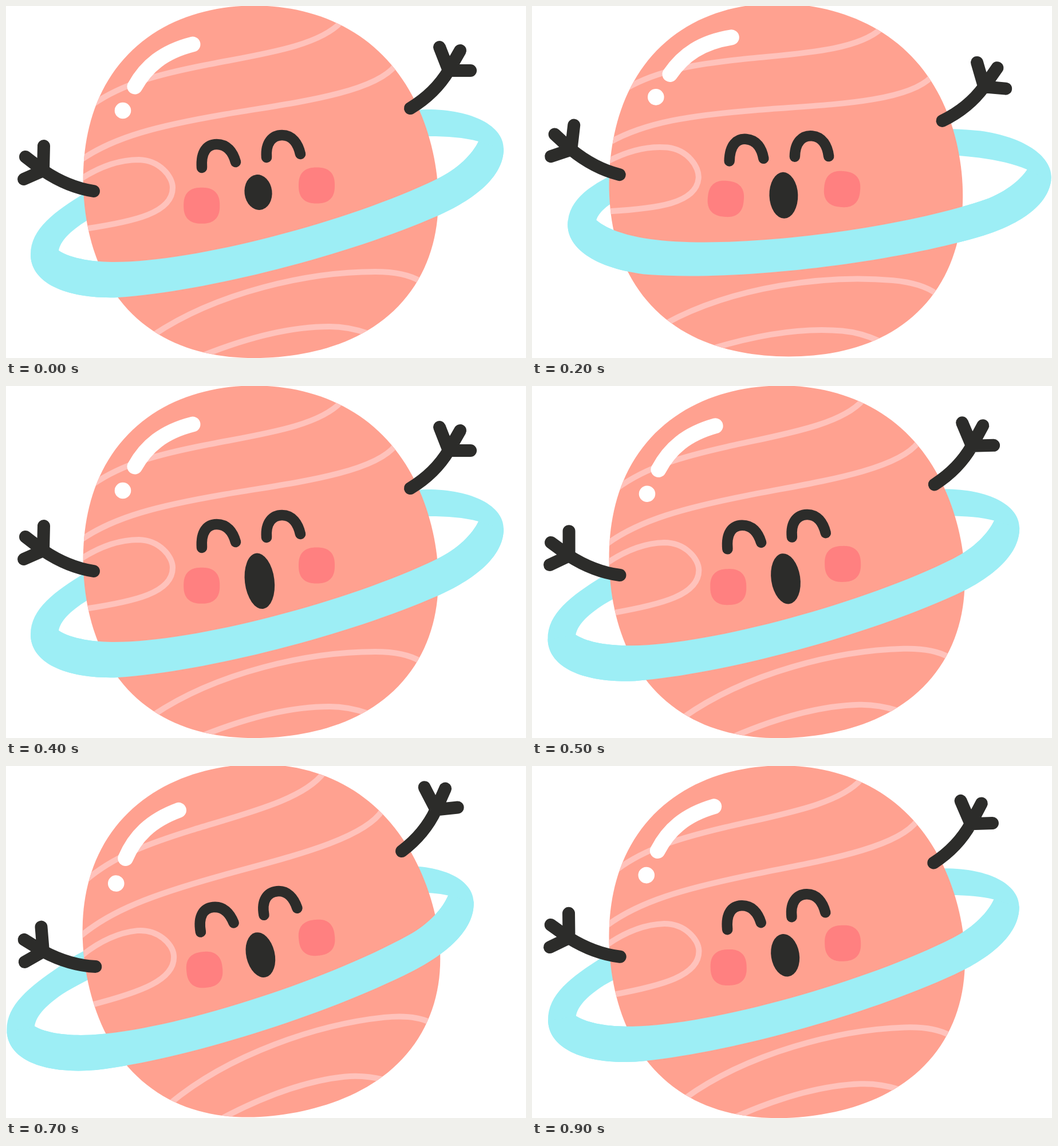
Write an HTML page with a canvas that moves like this. It is 908x616 px and loops after 1 s.

```html
<!DOCTYPE html>
<html lang="en">
<head>
<meta charset="utf-8">
<title>Singing planet</title>
<style>
  html, body { margin: 0; width: 100%; height: 100%; overflow: hidden; background: #fff; }
  canvas { display: block; }
</style>
</head>
<body>
<canvas id="stage" width="908" height="616"></canvas>
<script>
const ctx = document.getElementById('stage').getContext('2d');
const CX = 444, CY = 308;          // planet pivot
const RX = 458.5, RY = 332.5;      // ring pivot
const STEP = 100, BEATS = 10;
const RAD = Math.PI / 180;

const SKIN = '#ffa190', STRIPE = '#ffc2bb', CYAN = '#9deef5';
const INK = '#2c2c2a', BLUSH = '#ff8080', WHITE = '#fff';

// linear motion through [beat, value] keys
function track(keys, beat) {
  const i = keys.findIndex(key => key[0] > beat);
  const [t0, v0] = keys[i - 1], [t1, v1] = keys[i];
  return v0 + (v1 - v0) * (beat - t0) / (t1 - t0);
}

const swingKeys = [[0, 0], [2, 1], [4, 0], [6, -0.47], [7, -1], [10, 0]];
const mouthKeys = [[0, 31], [1, 40.5], [2, 40.5], [4, 49], [6, 40], [7, 40], [9, 37.5], [10, 31]];

// short lean to the right, then a longer one to the left
function poseAt(beat) {
  const swing = track(swingKeys, beat);
  const right = beat < 4;
  const phase = right ? beat / 4 : (beat - 4) / 6;
  const slide = Math.sin(Math.PI * phase) ** 1.5;
  const tilt = swing * (right ? 5.2 : 6);
  return {
    tilt,
    bob: -0.09 * tilt * tilt,
    ringTilt: swing * (right ? 7.9 : 3),
    dx: slide * (right ? 30 : -47.5),
    dy: slide * (right ? -2 : 8.5),
    open: track(mouthKeys, beat)
  };
}

function blob(x, y, radius) {
  const p = new Path2D();
  for (let deg = 0; deg < 360; deg += 2) {
    const a = deg * RAD, r = radius(a);
    p.lineTo(x + r * Math.cos(a), y + r * Math.sin(a));
  }
  p.closePath();
  return p;
}

const wave = (a, k, size, phase) => size * Math.cos(k * a - phase * RAD);
const lumpy = a => 313.7 + wave(a, 1, 3.3, 124) + wave(a, 2, 4, 82) +
  wave(a, 3, 3.6, 57) + wave(a, 4, 5.2, 160);
const squircle = a =>
  31.5 / (Math.abs(Math.cos(a)) ** 2.5 + Math.abs(Math.sin(a)) ** 2.5) ** 0.4;

const planet = blob(CX, CY, lumpy);
const cheeks = [blob(341.7, 349.3, squircle), blob(542.5, 314, squircle)];

const stripes = new Path2D(
  'M585 28C545 72 440 85 345 104C270 119 205 135 152 172' +
  'M680 104C640 156 480 172 380 190C270 209 190 228 130 270' +
  'M130 303C170 277 205 269 232 269C268 270 291 298 291 318C291 362 225 377 138 390' +
  'M257 576C370 500 530 465 645 465C680 465 706 471 724 482' +
  'M345 611C410 585 490 561 565 561C592 561 612 566 632 573');
const shine = new Path2D('M225 141C245 105 275 80 326 67');
const eyes = new Path2D(
  'M342 283C340 255 351 242 368 242C386 242 396 255 401 273' +
  'M455 265C453 239 465 226 482 226C500 226 510 241 514 259');
const arms = new Path2D(
  'M706 179Q749 153 773 113L757 72M773 113L793 78M773 113L811 113' +
  'M153 324Q108 317 65 288L34 264M65 288L66 245M65 288L31 303');

const underside = 'C869 300 815 340 754 367C600 435 350 500 195 510C100 513 43 482 43 435';
const frontEdge = 'M92 428C115 443 155 448 190 448C330 448 600 377 752 303C790 285 815 258 825 237';
const ring = new Path2D(
  'M43 435C43 390 84 360 140 326C240 254 590 188 735 181C815 181 869 210 869 250' + underside + 'Z' +
  frontEdge + 'C800 230 770 228 739 228C500 232 245 318 142 375C110 395 95 412 92 428Z');
const ringFront = new Path2D(frontEdge + 'L869 250' + underside + 'Z');

function fill(path, color, rule) {
  ctx.fillStyle = color;
  ctx.fill(path, rule || 'nonzero');
}

function stroke(path, color, width) {
  ctx.strokeStyle = color;
  ctx.lineWidth = width;
  ctx.stroke(path);
}

function ellipse(x, y, rx, ry, tilt, color) {
  const p = new Path2D();
  p.ellipse(x, y, rx, ry, tilt * RAD, 0, 2 * Math.PI);
  fill(p, color);
}

// draw with a rotation about (x, y) followed by a shift
function posed(x, y, tilt, dx, dy, draw) {
  ctx.save();
  ctx.translate(x + dx, y + dy);
  ctx.rotate(tilt * RAD);
  ctx.translate(-x, -y);
  draw();
  ctx.restore();
}

function drawBody() {
  fill(planet, SKIN);
  ctx.save();
  ctx.clip(planet);
  stroke(stripes, STRIPE, 10);
  ctx.restore();
  stroke(shine, WHITE, 27);
  ellipse(204, 183, 14.3, 14.3, 0, WHITE);
}

function drawFace(open) {
  for (const cheek of cheeks) fill(cheek, BLUSH);
  stroke(eyes, INK, 18.5);
  const grow = open - 31;
  ellipse(440.5 + grow * 0.13, 326 + grow * 0.85, 24 + grow * 0.1, open, -7, INK);
}

function render(time) {
  const pose = poseAt(Math.floor(time / STEP) % BEATS);
  const onPlanet = draw => posed(CX, CY, pose.tilt, 0, pose.bob, draw);
  const onRing = draw => posed(RX, RY, pose.ringTilt, pose.dx, pose.dy, draw);

  ctx.fillStyle = WHITE;
  ctx.fillRect(0, 0, 908, 616);
  onRing(() => fill(ring, CYAN, 'evenodd'));
  onPlanet(() => { drawBody(); drawFace(pose.open); });
  onRing(() => fill(ringFront, CYAN));
  onPlanet(() => stroke(arms, INK, 22));
}

ctx.lineCap = ctx.lineJoin = 'round';
const start = performance.now();
function tick() {
  render(performance.now() - start);
  requestAnimationFrame(tick);
}
tick();
</script>
</body>
</html>
```
